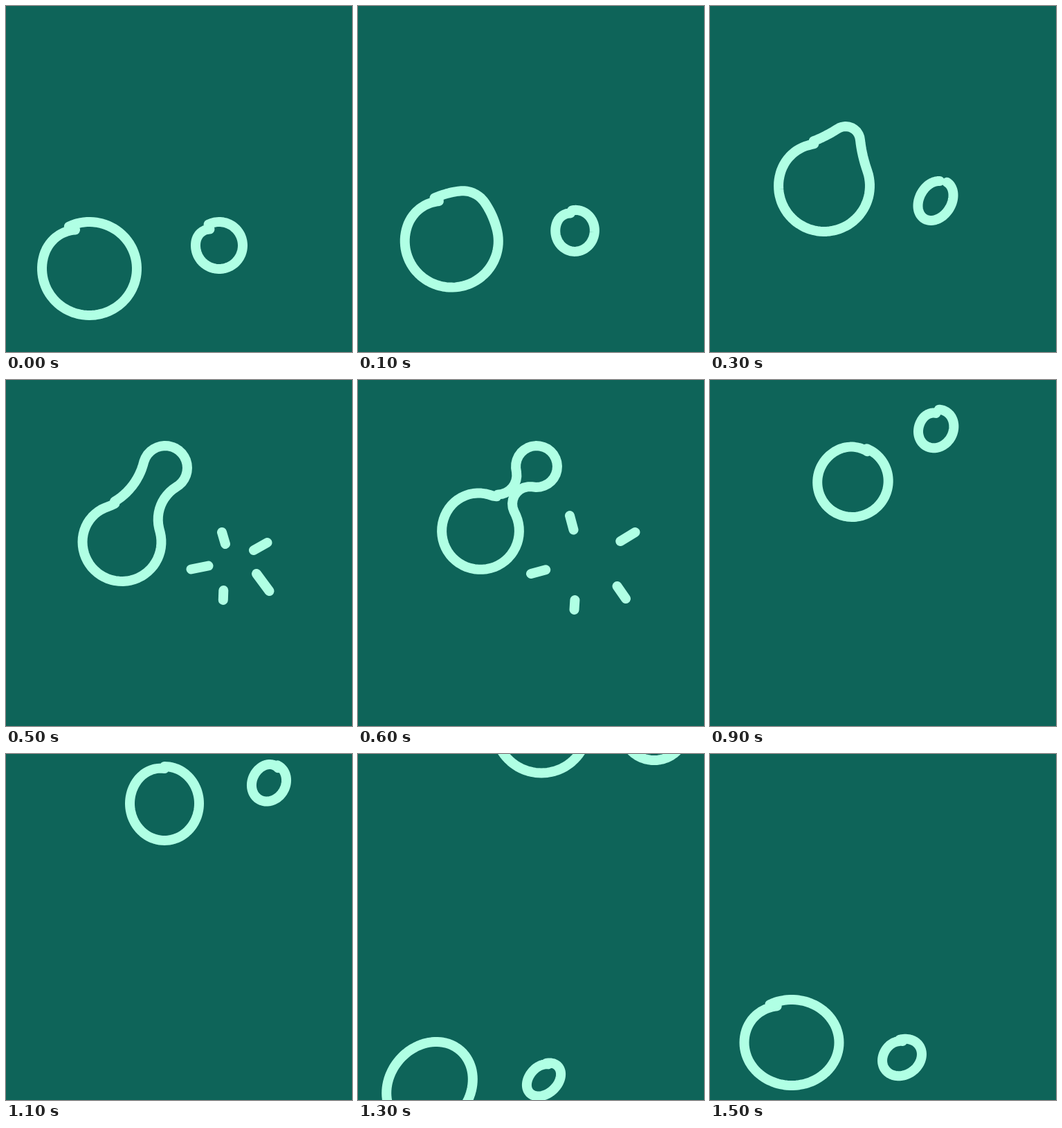
Write an HTML page that moves like this. It is 500x500 px and loops after 1.6 s.

```html
<!DOCTYPE html>
<html lang="en">
<head>
<meta charset="utf-8">
<title>Bubbles</title>
<style>
  html, body { margin: 0; width: 100%; height: 100%; overflow: hidden; background: #0e6459; }
  svg { display: block; width: 100vw; height: 100vh; }
  path { fill: none; stroke: #b0ffe4; stroke-width: 14; stroke-linecap: round; stroke-linejoin: round; }
</style>
</head>
<body>
<svg viewBox="0 0 500 500"><path id="ink"/></svg>
<script>
const LOOP = 1600, STEP = 100, N = 96;
const rad = deg => deg * Math.PI / 180;
const mix = (a, b, k) => a + (b - a) * k;
const mixPt = (p, q, k) => [mix(p[0], q[0], k), mix(p[1], q[1], k)];
const shift = (line, dx, dy) => line.map(([x, y]) => [x + dx, y + dy]);

// Evenly spaced points along a line, so that any two poses can be blended
function even(line) {
  const dist = [0];
  for (let i = 1; i < line.length; i++) {
    dist.push(dist[i - 1] + Math.hypot(line[i][0] - line[i - 1][0], line[i][1] - line[i - 1][1]));
  }
  const out = [];
  for (let n = 0, i = 1; n <= N; n++) {
    const want = dist[dist.length - 1] * n / N;
    while (i < line.length - 1 && dist[i] < want) i++;
    out.push(mixPt(line[i - 1], line[i], (want - dist[i - 1]) / (dist[i] - dist[i - 1] || 1)));
  }
  return out;
}

// Pulls the start of a stroke towards the centre, like a pen that misses its end
function hooked(line, cx, cy, depth) {
  return even(line).map((p, n) => {
    const k = Math.max(0, 1 - n / N / 0.14);
    return mixPt(p, [cx, cy], depth * k * k / Math.hypot(p[0] - cx, p[1] - cy));
  });
}

function arc(cx, cy, r, from, to) {
  return Array.from({ length: 49 }, (_, i) => {
    const a = mix(from, to, i / 48);
    return [cx + r * Math.cos(a), cy + r * Math.sin(a)];
  });
}

// Hand-drawn oval; angles in degrees, lap is how far the end passes the start
function ring(cx, cy, rx, ry, { tilt = 0, start = -90, lap = 0, hook = 0 } = {}) {
  const line = [];
  for (let i = 0; i <= 180; i++) {
    const a = rad(start - (360 + lap) * i / 180), b = a - rad(tilt);
    const r = rx * ry / Math.hypot(ry * Math.cos(b), rx * Math.sin(b));
    line.push([cx + r * Math.cos(a), cy + r * Math.sin(a)]);
  }
  return hooked(line, cx, cy, hook);
}

// Two circles joined by a hollow curve on each side
function gourd([x1, y1, r1], [x2, y2, r2], left, right, hook) {
  const d = Math.hypot(x2 - x1, y2 - y1), ux = (x2 - x1) / d, uy = (y2 - y1) / d;
  const join = f => {
    const x = (d * d + (r1 + f) ** 2 - (r2 + f) ** 2) / (2 * d);
    const h = Math.sqrt((r1 + f) ** 2 - x * x);
    return { x, h, f, b: Math.atan2(h, x), c: Math.atan2(h, x - d) };
  };
  const L = join(left), R = join(right), PI = Math.PI;
  const seam = mix(PI - L.c, PI - L.b, 0.85);
  const line = [
    ...arc(L.x, -L.h, L.f, seam, PI - L.b),
    ...arc(0, 0, r1, -L.b, R.b - 2 * PI),
    ...arc(R.x, R.h, R.f, R.b + PI, R.c + PI),
    ...arc(d, 0, r2, R.c, -L.c),
    ...arc(L.x, -L.h, L.f, PI - L.c, seam)
  ].map(([x, y]) => [x1 + x * ux - y * uy, y1 + x * uy + y * ux]);
  return hooked(line, x1, y1, hook);
}

const smallOpen = ring(326, 281, 31, 23, { tilt: -58, start: -78, lap: -20, hook: 1 });
const bodyLow = ring(195, 184.5, 55, 53.5, { start: -52, lap: 4, hook: 3 });
const budLow = ring(299.5, 85.5, 31, 26.5, { tilt: -60, start: -105, lap: -16, hook: 4 });

const tracks = [
  // large bubble grows a bud
  [[0, ring(120.5, 379.5, 68.5, 67.5, { start: -110, lap: 6, hook: 8 })],
   [300, gourd([165, 260, 66], [196, 195, 21], 200, 200, 4)],
   [400, gourd([166, 248, 61], [215, 157, 28], 120, 90, 4)],
   [500, gourd([167.5, 234, 57], [230, 127, 32], 92, 55, 3)],
   [600, gourd([177, 218, 56], [258, 125, 30], 28, 25, 3)]],
  // small bubble that pops
  [[0, ring(308, 346, 34, 34, { start: -120, lap: -3, hook: 7 })],
   [300, smallOpen], [400, shift(smallOpen, 4, -14)]],
  // the two halves after the split
  [[700, shift(bodyLow, -9, 17)], [800, bodyLow],
   [1100, ring(229, 71.5, 50, 53.5, { hook: 3 })],
   [1300, ring(265, -40, 67.5, 67.5)]],
  [[700, shift(budLow, -17, 16)], [800, budLow],
   [1100, ring(380, 41.5, 28, 24, { tilt: -60, start: -58, lap: 6, hook: 3 })],
   [1300, ring(428, -33, 45, 42)]],
  // next pair rising from below
  [[1200, ring(96, 512, 68, 55, { start: -110 })],
   [1300, ring(103.5, 480, 68, 58, { tilt: -50, start: -110 })],
   [1500, ring(118, 417, 68.5, 62, { start: -112, lap: 8, hook: 6 })]],
  [[1200, ring(260, 506, 27, 26, { start: -75 })],
   [1300, ring(268.5, 470.5, 28, 20, { tilt: -43, start: -74, lap: 8, hook: 2 })],
   [1500, ring(277.5, 438.5, 30, 25, { tilt: -35, start: -88, lap: 10, hook: 3 })]]
];

// Each spark: inner end, outer end, resting place
const POP = 500, FADE = 300;
const sparks = [
  [[317, 237], [312, 220], [306, 196]],
  [[358, 246], [377.5, 235], [400.5, 220]],
  [[292.5, 268.5], [267.5, 273.5], [250, 280]],
  [[314.3, 304], [313.8, 318], [312.5, 332]],
  [[362, 280], [380.5, 305], [387, 316]]
];

function sparkLines(t) {
  const p = (t - POP) / FADE;
  if (p < 0 || p > 1) return [];
  const tail = 0.9 * (1 - (1 - p) ** 2), head = Math.min(1, 3 * p);
  return sparks.map(([a, b, end]) => [mixPt(a, end, tail), mixPt(b, end, head)]);
}

function poseAt(keys, t) {
  if (t < keys[0][0] || t > keys[keys.length - 1][0]) return null;
  const i = Math.max(1, keys.findIndex(k => k[0] >= t));
  const [t0, a] = keys[i - 1], [t1, b] = keys[i];
  return a.map((p, n) => mixPt(p, b[n], (t - t0) / (t1 - t0)));
}

const toPath = line => 'M' + line.map(p => p[0].toFixed(2) + ' ' + p[1].toFixed(2)).join('L');
const ink = document.getElementById('ink');
let shown = -1;

function draw(ms) {
  const t = Math.floor(ms % LOOP / STEP) * STEP;
  if (t === shown) return;
  shown = t;
  const lines = tracks.map(keys => poseAt(keys, t)).filter(Boolean).concat(sparkLines(t));
  ink.setAttribute('d', lines.map(toPath).join(''));
}

const start = performance.now();
function tick() {
  draw(performance.now() - start);
  requestAnimationFrame(tick);
}
tick();
</script>
</body>
</html>
```
